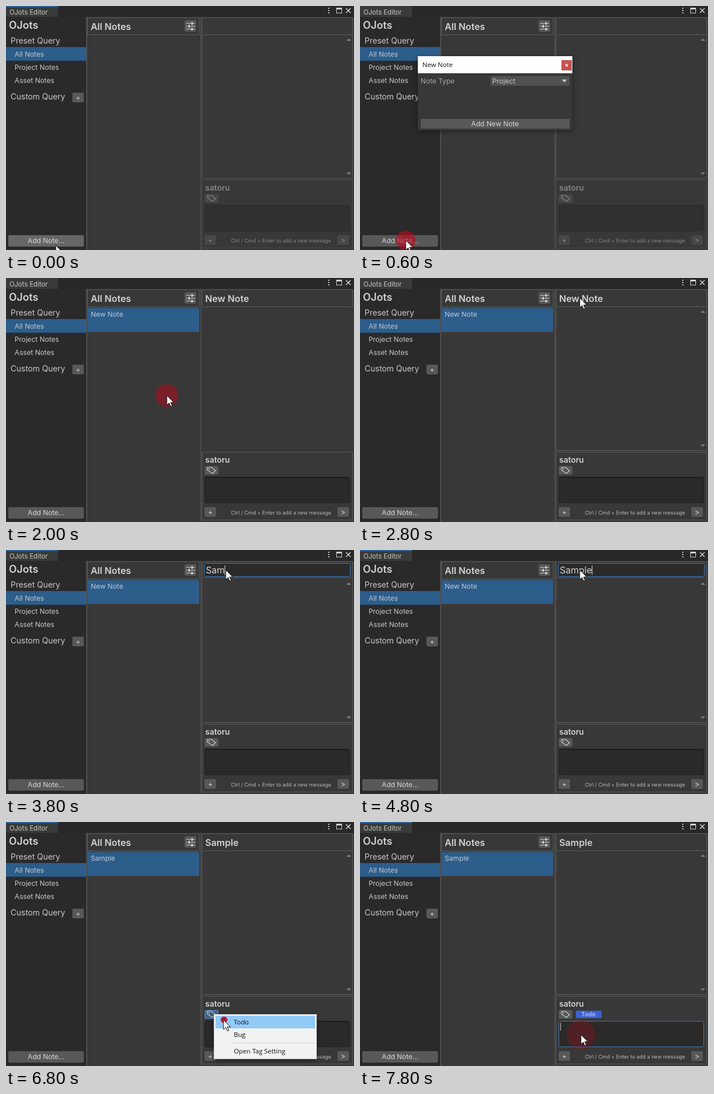
An HTML page with a canvas for the animation above (8 s loop, 608 by 428 pixels).

```html
<!DOCTYPE html>
<html lang="en">
<head>
<meta charset="utf-8">
<style>
html, body { margin: 0; width: 608px; height: 428px; overflow: hidden; background: #383838; }
canvas { display: block; }
</style>
</head>
<body>
<canvas id="stage" width="608" height="428"></canvas>
<script>
const ctx = document.getElementById('stage').getContext('2d');
const LOOP = 8000, STEP = 200;
const APP = 'OJots', USER = 'satoru';
const SYSTEM = '"Open Sans", sans-serif';
const LINE = '#5a5a5a', BUTTON = '#585858', BLUE = '#2c5d8b', FIELD = '#2a2a2a', FOCUS = '#3a79bb';

// Pointer stops: time, x, y
const pointer = [
  [0, 87, 420], [400, 80, 411], [800, 80, 411], [1400, 265, 222], [1800, 281, 206],
  [2200, 281, 206], [2800, 384, 35], [5400, 384, 35], [6200, 363, 338],
  [6400, 363, 338], [6800, 380, 347], [7000, 380, 347], [7600, 386, 373], [8000, 386, 373]
];
// Clicks: start time, x, y
const clicks = [[350, 80, 411], [1700, 281, 206], [2850, 384, 35], [6080, 363, 338], [6750, 381, 347], [7400, 386, 373]];

function fill(x, y, w, h, color, radius = 0) {
  ctx.fillStyle = color;
  ctx.beginPath();
  ctx.roundRect(x, y, w, h, radius);
  ctx.fill();
}

function frame(x, y, w, h, color = LINE, radius = 0) {
  ctx.strokeStyle = color;
  ctx.lineWidth = 1;
  ctx.beginPath();
  ctx.roundRect(x + .5, y + .5, w - 1, h - 1, radius);
  ctx.stroke();
}

function text(str, x, y, size = 12.15, { color = '#c8c8c8', weight = 400, align = 'left', family = 'Inter, sans-serif' } = {}) {
  ctx.font = `${weight} ${size}px ${family}`;
  ctx.textAlign = align;
  ctx.fillStyle = color;
  ctx.fillText(str, x, y);
}

function path(points, { color, stroke, width = 1 }) {
  ctx.beginPath();
  points.forEach(([x, y]) => ctx.lineTo(x, y));
  ctx.closePath();
  if (color) { ctx.fillStyle = color; ctx.fill(); }
  if (stroke) { ctx.strokeStyle = stroke; ctx.lineWidth = width; ctx.stroke(); }
}

function triangle(x, y, half, height, color) {
  path([[x - half, y - height / 2], [x + half, y - height / 2], [x, y + height / 2]], { color });
}

const button = (x, y, w, h, color = BUTTON) => fill(x, y, w, h, color, 2);

function cross(x, y, r, color, width) {
  ctx.strokeStyle = color;
  ctx.lineWidth = width;
  ctx.beginPath();
  ctx.moveTo(x - r, y - r); ctx.lineTo(x + r, y + r);
  ctx.moveTo(x + r, y - r); ctx.lineTo(x - r, y + r);
  ctx.stroke();
}

const heading = (str, x, y, size, color = '#d2d2d2') => text(str, x, y, size, { weight: 600, color });

function drawTopBar(active) {
  fill(0, 0, 608, 19, '#282828');
  fill(0, 0, 91, 19, '#3a3a3a');
  if (active) fill(0, 0, 91, 2, '#2f6096');
  text(APP + ' Editor', 6, 15, 11.5);
  for (const y of [3, 7, 11]) fill(563, y, 2, 2, '#c8c8c8');
  frame(577, 4, 10, 9, '#d0d0d0');
  fill(577, 3, 10, 3, '#d0d0d0');
  cross(598, 8, 4, '#d0d0d0', 1.6);
}

function drawSidebar(hover) {
  fill(0, 19, 140, 409, FIELD);
  heading(APP, 5, 39.5, 18);
  text('Preset Query', 8, 66, 14);
  fill(0, 72, 140, 24, BLUE);
  ['All Notes', 'Project Notes', 'Asset Notes'].forEach((name, i) => text(name, 15, 89 + 23 * i));
  text('Custom Query', 8, 164, 14);
  button(116, 152, 20, 17);
  text('+', 126, 165, 12, { align: 'center', weight: 500 });
  button(4, 402, 132, 20, hover ? '#676767' : BUTTON);
  text('Add Note...', 70, 416, 12, { align: 'center', color: '#d8d8d8' });
}

function drawList(name) {
  fill(140, 19, 2, 409, '#505050');
  frame(142, 20, 196, 31);
  heading('All Notes', 148, 42, 16.2);
  button(312, 25, 20, 20);
  [[30, 324], [35, 319], [40, 324]].forEach(([y, knob]) => {
    fill(315, y, 15, 1, '#d0d0d0');
    fill(knob, y - 2, 2, 5, '#d8d8d8');
  });
  if (name) {
    fill(143, 53, 194, 41, BLUE);
    frame(142, 52, 196, 43, '#4a4a4a');
    text(name, 148, 67.5, 12.15, { color: '#bccad8' });
  }
}

function drawTag(x, y, color) {
  path([[x, y], [x + 7, y], [x + 14, y + 6], [x + 9, y + 11], [x, y + 5]], { stroke: color, width: 1.2 });
  fill(x + 2, y + 2, 2, 2, color, 1);
}

function drawDetail({ enabled, title, typed, selected, scroll, tagOpen, todo, focused }) {
  const strong = enabled ? '#d0d0d0' : '#858585';
  const face = enabled ? BUTTON : '#474747';
  fill(340, 19, 1, 409, LINE);
  const editing = typed !== undefined;
  const split = editing ? 48 : 50;
  frame(342, 20, 264, split - 19);
  if (editing) {
    fill(346, 23, 256, 24, FIELD, 3);
    frame(346, 23, 256, 24, FOCUS, 3);
    ctx.font = '16px Inter, sans-serif';
    const width = ctx.measureText(typed).width;
    if (selected) fill(349, 26, width, 18, '#3a6ea5');
    text(typed, 349, 41, 16, { color: '#d2d2d2' });
    if (!selected) fill(Math.round(349 + width), 27, 1, 17, '#d2d2d2');
  } else {
    heading(title, 348, 42, 16.2);
  }
  if (scroll) {
    frame(342, split, 264, 303 - split);
    triangle(599, 59, 4, -4, '#808080');
    triangle(599, 294, 4, 4, '#808080');
  }

  frame(342, 305, 264, 120, enabled ? LINE : '#494949');
  heading(USER, 348, 324, 14, strong);
  button(347, 330, 24, 15, tagOpen ? '#46607c' : face);
  if (tagOpen) frame(347, 330, 24, 15, '#5b9be0', 2);
  drawTag(352, 332, strong);
  if (todo) {
    fill(377, 331, 45, 13, '#3a62d2', 2);
    text('Todo', 399, 341, 10.5, { align: 'center', weight: 600, color: '#b4bfe2' });
  }
  fill(347, 349, 254, 46, enabled ? FIELD : '#303030', 3);
  frame(347, 349, 254, 46, focused ? FOCUS : enabled ? '#202020' : '#2a2a2a', 3);
  if (enabled && !focused) fill(349, 349, 250, 1, '#0d0d0d');
  if (focused) fill(350, 352, 1, 14, '#c8c8c8');
  button(347, 402, 20, 17, face);
  button(579, 402, 20, 17, face);
  text('+', 357, 415, 12, { align: 'center', weight: 500, color: strong });
  text('>', 589, 415, 12, { align: 'center', weight: 500, color: strong });
  text('Ctrl / Cmd + Enter to add a new message', 393, 415, 9, { color: enabled ? '#b8b8b8' : '#858585' });
}

function withShadow(draw) {
  ctx.save();
  ctx.shadowColor = 'rgba(0,0,0,.45)';
  ctx.shadowBlur = 8;
  ctx.shadowOffsetY = 2;
  draw();
  ctx.restore();
}

function drawDialog() {
  withShadow(() => fill(101, 88, 270, 130, '#383838'));
  fill(101, 88, 270, 30, '#fff');
  text('New Note', 109, 107, 11.5, { color: '#111', family: SYSTEM });
  fill(352, 95, 18, 18, '#c75050');
  cross(361, 104, 2.2, '#fff', 1.4);
  text('Note Type', 106, 136, 12.15, { color: '#a8a8a8' });
  button(228, 123, 138, 17, '#515151');
  text('Project', 231, 136);
  triangle(357, 131.5, 4.5, 5, '#c8c8c8');
  button(106, 198, 260, 17);
  text('Add New Note', 236, 211, 12.15, { align: 'center', color: '#d8d8d8' });
}

function drawMenu(highlight) {
  withShadow(() => fill(363, 337, 180, 79, '#f2f2f2'));
  frame(363, 337, 180, 79, '#c8c8c8');
  if (highlight) fill(366, 340, 174, 22, '#91c9f7');
  fill(394, 387, 145, 1, '#cfcfcf');
  [['Todo', 355], ['Bug', 377], ['Open Tag Setting', 406]].forEach(([label, y]) =>
    text(label, 398, y, 11.4, { color: '#111', family: SYSTEM }));
}

function drawRipples(t) {
  for (const [start, x, y] of clicks) {
    const age = (t - start) / 500;
    if (age < 0 || age >= 1) continue;
    ctx.fillStyle = `rgba(190,5,25,${Math.min(.9, 1.15 * (1 - age) + .03)})`;
    ctx.beginPath();
    ctx.arc(x, y, 3 + 28 * age, 0, 7);
    ctx.fill();
  }
}

function drawPointer(t) {
  const i = pointer.findIndex(stop => stop[0] > t);
  const [t0, x0, y0] = pointer[i - 1], [t1, x1, y1] = pointer[i];
  const p = (t - t0) / (t1 - t0), k = p * p * (3 - 2 * p);
  ctx.save();
  ctx.translate(x0 + (x1 - x0) * k, y0 + (y1 - y0) * k);
  path([[0, 0], [0, 17], [4, 13.3], [6.8, 19.5], [9.4, 18.4], [6.6, 12.3], [12, 12.3]],
    { color: '#fff', stroke: '#111' });
  ctx.restore();
}

function typedTitle(t) {
  if (t < 3000 || t >= 5400) return undefined;
  return t < 3400 ? 'New Note' : 'Sample'.slice(0, (t - 3400) / 200 + 1);
}

function render(now) {
  const t = Math.floor(now % LOOP / STEP) * STEP;
  const created = t >= 2000;
  const name = !created ? '' : t < 5400 ? 'New Note' : 'Sample';
  fill(0, 0, 608, 428, '#383838');
  drawTopBar(t < 600 || t >= 3000);
  drawSidebar(t < 600);
  drawList(name);
  drawDetail({
    enabled: created,
    title: name,
    typed: typedTitle(t),
    selected: t < 3400,
    scroll: !created || t >= 2200,
    tagOpen: t >= 6200 && t < 7000,
    todo: t >= 7000,
    focused: t >= 7600
  });
  if (t >= 600 && t < 2000) drawDialog();
  if (t >= 6600 && t < 7000) drawMenu(t >= 6800);
  drawRipples(t);
  drawPointer(t);
  requestAnimationFrame(render);
}
requestAnimationFrame(render);
</script>
</body>
</html>
```
